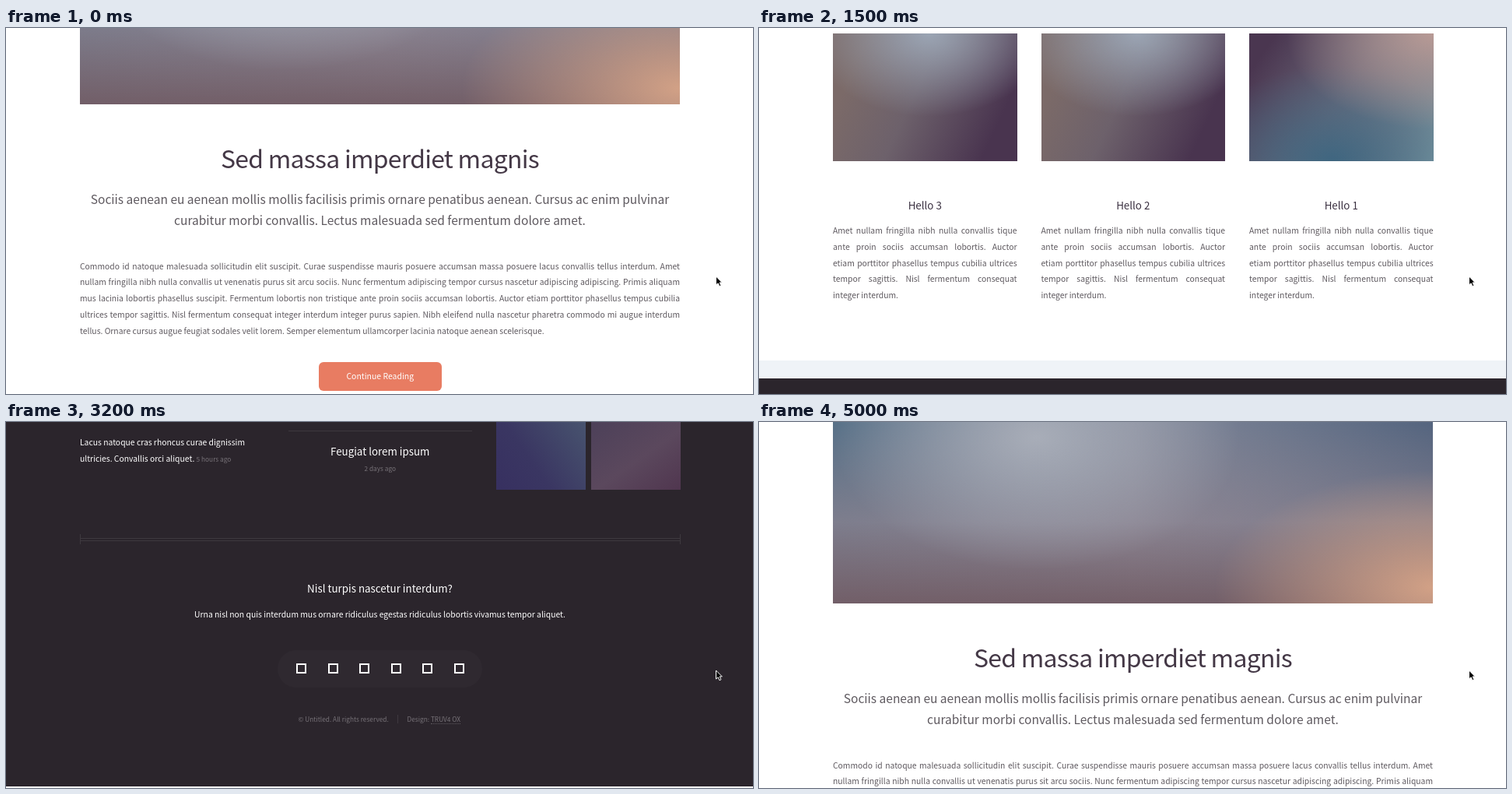
Write an HTML page that moves like this. It is 960 by 470 pixels and loops after 5.1 s.

```html
<!DOCTYPE html>
<html lang="en">
<head>
<meta charset="utf-8">
<title>Scrolling page</title>
<style>
html, body { margin: 0; width: 960px; height: 470px; overflow: hidden; background: #fff; }
body { position: relative; font: 10.35px "Noto Sans CJK SC", "Noto Sans CJK JP", "Noto Sans CJK", "Open Sans", sans-serif; }
#page { position: absolute; left: 0; top: 0; width: 960px; will-change: transform; }
#page div, #cursor { position: absolute; box-sizing: border-box; }
#page .text { height: 0; line-height: 0; white-space: nowrap; margin-top: -.436em; }
.text small { font-size: 8.3px; color: #777278; }
.text u { text-decoration: none; border-bottom: 1px dotted #5c575d; }
#cursor { left: 909px; top: 316px; }
</style>
</head>
<body>
<div id="page"></div>
<svg id="cursor" width="16" height="20" viewBox="0 0 16 20">
  <path d="M3.5 3v11l2.6-2.3 1.8 4 2-.9-1.8-3.9h3.2z" fill="#000" stroke="#fff" stroke-width="1"/>
</svg>
<script>
const page = document.getElementById('page');
const DARK = '#2b252c', RULE = '#3e393f', PLUM = '#443846', GREY = '#5e595f', DIM = '#777278';
const COLUMNS = [95, 362.5, 630], COLUMN = 236.5;
const BODY = 10.35, LEAD = 15.53, TITLE = 13.35, SMALL = 8.3, LEADING = 20.75;

function add(x, y, w, h, style) {
  const el = document.createElement('div');
  el.style.cssText = `left:${x}px;top:${y}px;width:${w}px;height:${h}px;${style}`;
  page.append(el);
  return el;
}
const box = (x, y, w, h, background, extra = '') => add(x, y, w, h, `background:${background};${extra}`);

// y is the baseline
function text(html, x, y, w, size, color, align = 'center') {
  const el = add(x, y, w, 0, `font-size:${size}px;color:${color};text-align:${align};text-align-last:${align}`);
  el.className = 'text';
  el.innerHTML = html;
  return el;
}
function paragraph(lines, x, y, w) {
  lines.forEach((line, i) =>
    text(line, x, y + i * LEADING, w, BODY, GREY, i < lines.length - 1 ? 'justify' : 'left'));
}
function heading(html, y) {
  text(html, 95, y, 771, 31.9, PLUM).style.letterSpacing = '-.0224em';
}
const square = (cx, cy, color) => add(cx - 6.5, cy - 6.5, 13, 13, `border:2px solid ${color}`);

// Article
box(95, -320, 771, 418, `
  radial-gradient(280px 150px at 100% 95%, #d2a186, #d2a18600),
  radial-gradient(260px 170px at 34% 49%, #a8adb8, #a8adb800),
  linear-gradient(#735d6600 45%, #8e838fb0 75%, #715c65 102%),
  linear-gradient(90deg, #587188, #84899a 50%, #55657f)`);
heading('Sed massa imperdiet magnis', 180);
text('Sociis aenean eu aenean mollis mollis facilisis primis ornare penatibus aenean. Cursus ac enim pulvinar', 95, 226, 771, LEAD, GREY);
text('curabitur morbi convallis. Lectus malesuada sed fermentum dolore amet.', 95, 252.5, 771, LEAD, GREY);
paragraph([
  'Commodo id natoque malesuada sollicitudin elit suscipit. Curae suspendisse mauris posuere accumsan massa posuere lacus convallis tellus interdum. Amet',
  'nullam fringilla nibh nulla convallis ut venenatis purus sit arcu sociis. Nunc fermentum adipiscing tempor cursus nascetur adipiscing adipiscing. Primis aliquam',
  'mus lacinia lobortis phasellus suscipit. Fermentum lobortis non tristique ante proin sociis accumsan lobortis. Auctor etiam porttitor phasellus tempus cubilia',
  'ultrices tempor sagittis. Nisl fermentum consequat integer interdum integer purus sapien. Nibh eleifend nulla nascetur pharetra commodo mi augue interdum',
  'tellus. Ornare cursus augue feugiat sodales velit lorem. Semper elementum ullamcorper lacinia natoque aenean scelerisque.',
], 95, 310, 771);
box(401.5, 429, 158.5, 37, '#e87c62', 'border-radius:6px');
text('Continue Reading', 401.5, 452, 158.5, 10.45, '#fff');
box(0, 538, 960, 23, '#eff3f7');

// Features
heading('Morbi ullamcorper et varius leo lacus', 667);
text('Ipsum volutpat consectetur orci metus consequat imperdiet duis integer semper magna.', 95, 713, 771, LEAD, GREY);
const dusk = `
  radial-gradient(65% 65% at 52% 0%, #9ba5b4, #9ba5b400),
  linear-gradient(115deg, #7b6a68 15%, #6d616b 45%, #49344f 85%)`;
const lagoon = `
  radial-gradient(80% 75% at 100% 0%, #b89a95, #b89a9500),
  radial-gradient(75% 75% at 45% 100%, #3f6680, #3f668000),
  linear-gradient(125deg, #4a3650 10%, #6b6879 50%, #7795a0)`;
COLUMNS.forEach((x, i) => {
  box(x, 756, COLUMN, 164, i < 2 ? dusk : lagoon);
  text(`Hello ${3 - i}`, x, 983, COLUMN, TITLE, '#3a3040');
  paragraph([
    'Amet nullam fringilla nibh nulla convallis tique',
    'ante proin sociis accumsan lobortis. Auctor',
    'etiam porttitor phasellus tempus cubilia ultrices',
    'tempor sagittis. Nisl fermentum consequat',
    'integer interdum.',
  ], x, 1013.5, COLUMN);
});
box(0, 1176, 960, 23, '#eff3f7');

// Footer
box(0, 1199, 960, 828, DARK);
COLUMNS.forEach(x => {
  const cx = x + COLUMN / 2;
  box(cx - 22.5, 1271.5, 45, 45, '#fff', 'border-radius:50%');
  square(cx, 1294, DARK);
});
[
  [1373, 'Amet nullam fringilla nibh nulla convallis tique'],
  [1394, 'ante sociis accumsan. <small>5 minutes ago</small>'],
  [1452, 'Hendrerit rutrum quisque. <small>30 minutes ago</small>'],
  [1510, 'Curabitur donec nulla massa laoreet nibh. Lorem'],
  [1531, 'praesent montes. <small>3 hours ago</small>'],
  [1589, 'Lacus natoque cras rhoncus curae dignissim'],
  [1610, 'ultricies. Convallis orci aliquet. <small>5 hours ago</small>'],
].forEach(([y, html]) => text(html, 95, y, COLUMN, BODY, '#fff', 'left'));
[1419, 1477, 1556].forEach(y => box(95, y, COLUMN, 1, RULE));

[
  ['Nisl fermentum integer', '3 hours ago'],
  ['Phasellus portitor lorem', '6 hours ago'],
  ['Magna tempus consequat', 'Yesterday'],
  ['Feugiat lorem ipsum', '2 days ago'],
].forEach(([title, age], i) => {
  const y = 1373 + i * 76.6;
  text(title, 362.5, y, COLUMN, TITLE, '#fff');
  text(age, 362.5, y + 18.5, COLUMN, SMALL, DIM);
  if (i) box(362.5, Math.round(y - 33), COLUMN, 1, RULE);
});

[
  '165deg, #978d8f, #7c6b69',
  '155deg, #9cabbe, #6688a0 45%, #50547a',
  '170deg, #32557a, #4d6079 55%, #6c6467',
  '200deg, #5b465a, #43314d',
  '235deg, #48546f, #3a3662 60%, #373060',
  '145deg, #4c4059, #5b485d 55%, #50364f',
].forEach((stops, i) =>
  box(630 + i % 2 * 122, 1358.5 + (i >> 1) * 98.6, 114.5, 90.8, `linear-gradient(${stops})`));

add(95, 1708, 772, 4, `border:solid ${RULE};border-width:1px 0`);
[95, 866].forEach(x => box(x, 1703, 1, 13, RULE));
text('Nisl turpis nascetur interdum?', 95, 1779, 771, TITLE, '#fff');
text('Urna nisl non quis interdum mus ornare ridiculus egestas ridiculus lobortis vivamus tempor aliquet.', 95, 1810, 771, BODY, '#fff');
box(349, 1852, 263, 48, '#2f2930', 'border-radius:24px');
for (let i = 0; i < 6; i++) square(379.5 + i * 40.5, 1875, '#fff');
text('© Untitled. All rights reserved.', 375.5, 1944, 120, SMALL, DIM, 'left');
box(503, 1935, 1, 11, RULE);
text('Design: <u>TRUV4 OX</u>', 515.5, 1944, 80, SMALL, DIM, 'left');
box(0, 2027, 960, 200, '#fff');

// Scroll path: time in ms, offset in px, speed in px/ms
const PATH = [
  [0, 0, .8], [700, 507, .42], [1500, 749, .42], [2200, 1245, .45],
  [3200, 1559, 0], [4300, 877, -.9], [5000, -135, -1.7],
];
const LOOP = 5100, STEP = 100;

function scrollAt(t) {
  const i = Math.max(1, PATH.findIndex(p => p[0] >= t));
  const [t0, y0, v0] = PATH[i - 1], [t1, y1, v1] = PATH[i];
  const d = t1 - t0, u = (t - t0) / d, w = 1 - u;
  return w * w * (1 + 2 * u) * y0 + u * u * (3 - 2 * u) * y1 + u * w * d * (w * v0 - u * v1);
}
function draw() {
  const t = Math.floor(performance.now() % LOOP / STEP) * STEP;
  page.style.transform = `translateY(${-Math.round(scrollAt(t))}px)`;
  requestAnimationFrame(draw);
}
draw();
</script>
</body>
</html>
```
